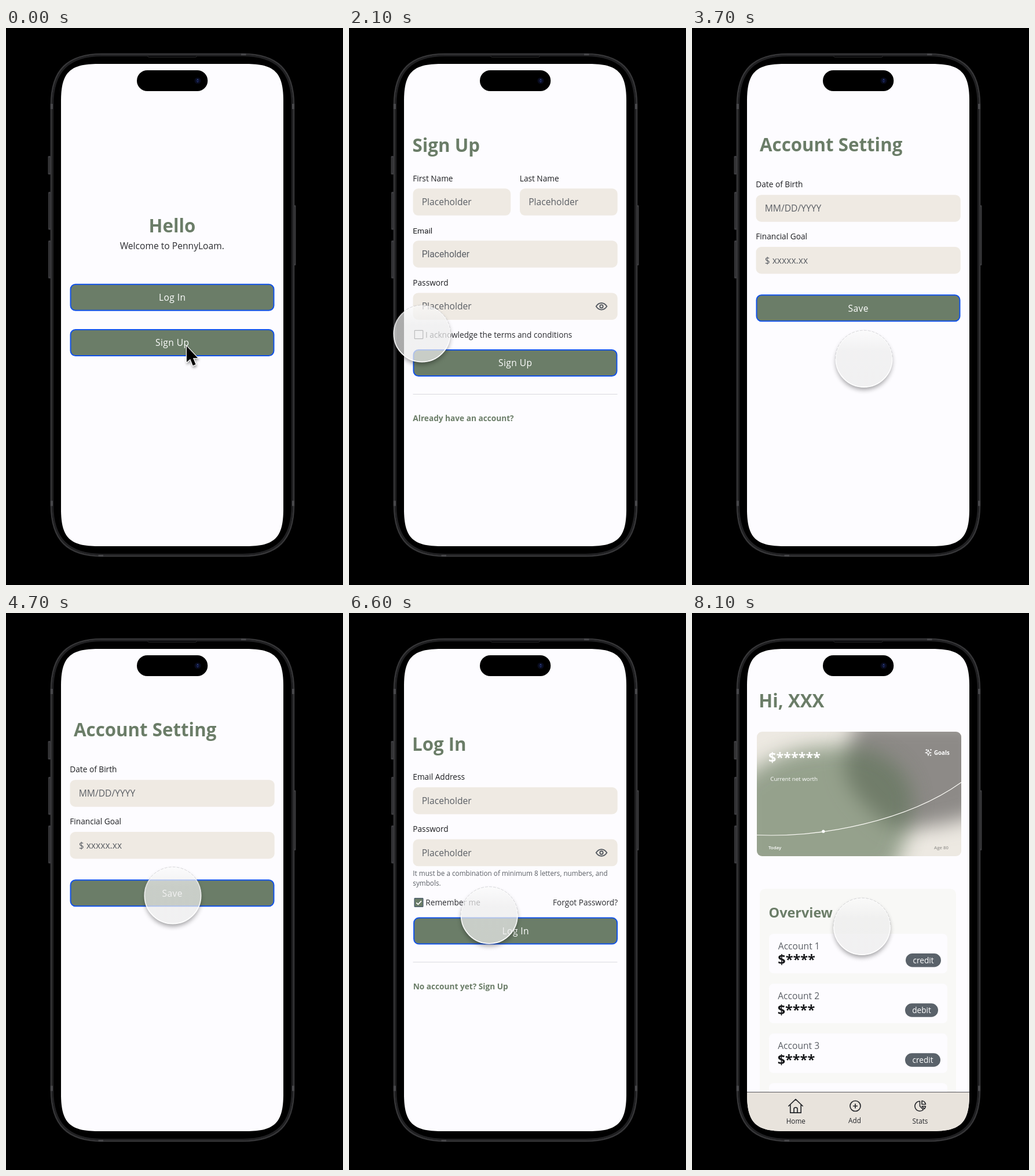
Recreate the animation shown at these times as an HTML page. Size 582 by 962 pixels, loop 8.2 s.

```html
<!DOCTYPE html>
<html lang="en">
<head>
<meta charset="utf-8">
<title>Budget app prototype</title>
<style>
  html, body { margin: 0; width: 100%; height: 100%; overflow: hidden; background: #000; }
  svg { display: block; width: 100vw; height: 100vh; }
  text { font-family: "Open Sans", "Noto Sans", sans-serif; fill: #1c1d20; white-space: pre; }
</style>
</head>
<body>
<svg id="stage" viewBox="0 0 582 962"></svg>
<script>
const GREEN = '#6b7d68', BLUE = '#1152ea', FIELD = '#efeae3', PAPER = '#fdfcff',
      GREY = '#5b5f65', INK = '#2b2c30';
const LOOP = 8200, STEP = 100;
const PT = 384 / 393; // stage pixels per design point

const el = (tag, attrs = {}, body = '') =>
  `<${tag} ${Object.entries(attrs).map(([k, v]) => `${k}="${v}"`).join(' ')}>${body}</${tag}>`;
const rect = (x, y, width, height, rx, fill, more = {}) => el('rect', { x, y, width, height, rx, fill, ...more });
const circle = (cx, cy, r, fill, more = {}) => el('circle', { cx, cy, r, fill, ...more });
const path = (d, fill = 'none', stroke = 'none', width = 1, more = {}) =>
  el('path', { d, fill, stroke, 'stroke-width': width, ...more });
const text = (x, y, size, str, more = {}) => el('text', { x, y, 'font-size': size * PT, ...more }, str);

// Rectangle with smoothed corners
function squircle(x, y, w, h, s, c) {
  const r = x + w, b = y + h;
  return `M${x + s} ${y}H${r - s}C${r - c} ${y} ${r} ${y + c} ${r} ${y + s}V${b - s}` +
    `C${r} ${b - c} ${r - c} ${b} ${r - s} ${b}H${x + s}C${x + c} ${b} ${x} ${b - c} ${x} ${b - s}` +
    `V${y + s}C${x} ${y + c} ${x + c} ${y} ${x + s} ${y}Z`;
}
const screenPath = squircle(95, 62, 384, 833, 64, 15);

// Interface parts
const title = (x, y, str) => text(x, y, 32, str, { 'font-weight': 700, style: `fill:${GREEN}` });
const label = (x, y, str, more) => text(x, y, 14, str, more);
const link = (x, y, str) => label(x, y, str, { 'font-weight': 700, style: `fill:${GREEN}` });
const rule = y => path(`M110.5 ${y}H463.5`, 'none', '#d9d9de', 1);
const field = (x, y, w, hint, font = '') =>
  rect(x, y, w, 46.5, 9, FIELD) + text(x + 15.2, y + 29, 16, hint, { style: `fill:${GREY};${font}` });
const button = (y, str, x = 111.5) =>
  rect(x, y, 351, 45, 8.5, GREEN, { stroke: BLUE, 'stroke-width': 2 }) +
  text(x + 175.7, y + 28.3, 16, str, { 'text-anchor': 'middle', 'letter-spacing': 0.4, style: 'fill:#fff' });
const eye = y =>
  path(`M426.8 ${y}Q430.5 ${y - 5.8} 436 ${y - 5.8}T445.3 ${y}Q441.5 ${y + 5.8} 436 ${y + 5.8}T426.8 ${y}Z`,
    'none', '#565b62', 1.9) + circle(436, y, 2.7, 'none', { stroke: '#565b62', 'stroke-width': 1.9 });
const checkbox = (y, id) =>
  rect(113.3, y, 14.4, 14.4, 0.5, 'none', { stroke: '#3b3c42', 'stroke-width': 1.2 }) +
  el('g', { id }, rect(113.3, y, 14.4, 14.4, 0.5, GREEN, { stroke: '#4d6170', 'stroke-width': 1.2 }) +
    path(`M116.3 ${y + 7.5}l3 3 5.6-6`, 'none', '#fff', 1.8));

const welcome =
  text(287, 353, 32, 'Hello', { 'font-weight': 700, 'text-anchor': 'middle', style: `fill:${GREEN}` }) +
  text(286.8, 382, 16, 'Welcome to PennyLoam.', { 'text-anchor': 'middle', style: `fill:${INK}` }) +
  button(442.8, 'Log In') + button(521, 'Sign Up');

const roboto = 'font-family:Roboto,sans-serif';
const signup =
  title(109.6, 214, 'Sign Up') +
  label(110.3, 264.5, 'First Name') + field(110.5, 277.3, 168.7, 'Placeholder') +
  label(294.8, 264.5, 'Last Name') + field(295, 277.3, 168.7, 'Placeholder') +
  label(110.3, 354.5, 'Email', { style: roboto }) + field(110.5, 367.2, 353.2, 'Placeholder', roboto) +
  label(110.3, 444.5, 'Password') + field(110.5, 457.4, 353.2, 'Placeholder') + eye(480.8) +
  checkbox(522.3, 'agreeTick') +
  label(132, 534.5, 'I acknowledge the terms and conditions', { style: `fill:${INK}` }) +
  button(556, 'Sign Up') + rule(632.5) + link(110.3, 679, 'Already have an account?');

const account =
  title(117, 213, 'Account Setting') +
  label(110.3, 275.3, 'Date of Birth') + field(110.5, 288.2, 353.2, 'MM/DD/YYYY') +
  label(110.3, 365.2, 'Financial Goal') + field(110.5, 378, 353.2, '$ xxxxx.xx') +
  button(461.2, 'Save');

const small = { style: `fill:${GREY}` };
const login =
  title(109, 237.5, 'Log In') +
  label(110.3, 288, 'Email Address') + field(110.5, 301, 353.2, 'Placeholder') +
  label(110.3, 378, 'Password') + field(110.5, 390.8, 353.2, 'Placeholder') + eye(414) +
  text(110.3, 454.3, 12, 'It must be a combination of minimum 8 letters, numbers, and', small) +
  text(110.3, 471, 12, 'symbols.', small) +
  checkbox(492.8, 'rememberTick') + label(132.3, 505, 'Remember me', { style: `fill:${INK}` }) +
  label(464, 505, 'Forgot Password?', { 'text-anchor': 'end', style: `fill:${INK}` }) +
  button(526.6, 'Log In', 112.1) + rule(603) + link(110.7, 650, 'No account yet? Sign Up');

const bold = (x, y, size, str, fill) => text(x, y, size, str, { 'font-weight': 700, style: `fill:${fill}` });
const worthCard =
  el('g', { 'clip-path': 'url(#cardClip)' },
    rect(112, 205, 353, 215, 0, '#ede9e2') +
    path('M285 185H500V345Q430 372 350 372Q268 320 262 262Z', '#8d8a87', 'none', 1, { filter: 'url(#haze)' }) +
    path('M80 292Q150 232 235 231C320 222 385 265 382 335Q378 375 346 450H80Z', '#5f7459', 'none', 1,
      { filter: 'url(#haze)', opacity: 0.62 }) +
    path('M112 383.5C225 388 372 359 465 292.5', 'none', '#fbfaf5', 1.2) + circle(226.8, 377.2, 2.6, '#fff')) +
  bold(132, 257.5, 24, '$******', '#fff') +
  text(135.3, 290, 10, 'Current net worth', { style: 'fill:#fff' }) +
  path('M408 236.5l1.3 3.4 3.4 1.3-3.4 1.3-1.3 3.4-1.3-3.4-3.4-1.3 3.4-1.3ZM405 235v3M403.5 236.5h3' +
    'M412.5 235v2.6M411.2 236.3h2.6M412 244.5v2.6M410.7 245.8h2.6', 'none', '#fff', 1.1) +
  bold(418, 244.7, 10, 'Goals', '#fff') +
  text(132, 408.3, 8, 'Today', { 'font-weight': 600, style: 'fill:#fff' }) +
  text(418, 408.3, 8, 'Age 80', { 'font-weight': 600, style: 'fill:#9a9894' });

const accountRow = (n, y, x, kind, pillX, pillW) =>
  rect(133, y, 308, 68.3, 8, PAPER) +
  text(x, y + 27, 16, 'Account ' + n, small) + bold(x - 0.5, y + 53.3, 24, '$****', '#17181b') +
  rect(pillX, y + 34, pillW, 23.5, 11.75, '#5a626a') +
  text(pillX + pillW / 2, y + 50.8, 14, kind, { 'text-anchor': 'middle', style: 'fill:#fff' });

const navText = (x, y, str) => text(x, y, 12, str, { 'text-anchor': 'middle', style: 'fill:#222428' });
const navBar =
  rect(95, 827, 384, 70, 0, '#e8e3dc') + path('M95 827.5H479', 'none', '#55555a', 1.2) +
  path('M166.8 851.5L179 839.8 191.2 851.5M169.8 849V863.2H188.2V849M176 863V856.5Q176 854.2 179 854.2T182 856.5V863',
    'none', '#25272b', 1.7, { 'stroke-linejoin': 'round', 'stroke-linecap': 'round' }) +
  circle(282, 851.5, 9, 'none', { stroke: '#25272b', 'stroke-width': 1.7 }) +
  path('M278 851.5h8M282 847.5v8', 'none', '#25272b', 1.7) +
  path('M393.5 843.2A8.5 8.5 0 1 0 399.5 857.7L393.5 851.7ZM397 842.5V848.5H403.5A7.5 7.5 0 0 0 397 842.5Z' +
    'M397 852H403.4A9 9 0 0 1 401.2 856.4Z', 'none', '#25272b', 1.6, { 'stroke-linejoin': 'round' }) +
  navText(179.3, 881.8, 'Home') + navText(281, 881, 'Add') + navText(394, 881.8, 'Stats');

const dashboard =
  title(115.3, 162.5, 'Hi, XXX') + worthCard +
  rect(117, 476.5, 339, 380, 9, '#f8f8f6') + bold(132.5, 526.3, 24, 'Overview', GREEN) +
  accountRow(1, 554, 148.8, 'credit', 369, 61) +
  accountRow(2, 640.2, 148.2, 'debit', 368, 57) +
  accountRow(3, 726.3, 148.2, 'credit', 368, 61) +
  rect(133, 812, 308, 68, 8, PAPER) + navBar;

// Device
const sideKey = (x, y, w, h) => rect(x, y, w, h, 1.5, '#3c3c3f') + rect(x + w / 3, y + 3, 1, h - 6, 0.5, '#242426');
const band = (x, y, w, h) => rect(x, y, w, h, 0, '#48484b');
const device =
  sideKey(72.5, 221, 5, 32) + sideKey(73, 283, 5, 65.5) + sideKey(73, 367, 5, 65.5) + sideKey(496.5, 306, 4, 104) +
  path(squircle(78, 45, 419, 867, 88, 28), '#000', '#363638', 2.6) +
  path(squircle(80.6, 47.6, 413.8, 861.8, 86, 27), '#000', '#202022', 3) +
  band(76.8, 131, 4, 9) + band(494, 131, 4, 9) + band(76.8, 816.5, 4, 9) + band(494, 816.5, 4, 9) +
  band(406, 44, 8.5, 3) + band(159.5, 910, 8.5, 3) +
  rect(245, 47.5, 84, 3, 1.5, '#08080a', { stroke: '#2c2c2e', 'stroke-width': 0.8 }) +
  path(screenPath, PAPER);
const island =
  rect(226, 73, 122.3, 36, 18, '#000') + circle(331, 91, 5.6, '#080b1c') +
  circle(331, 91, 2.8, '#10183c') + circle(331, 89, 1.2, '#2a3a75') + circle(331, 93, 1, '#26306a');

// Pointers, each with its origin at the hot spot
const arrow = path('M0 0V27.6L6.2 22.2 10.8 33.6 15.6 31.6 11 20.4H19.2Z', '#000', '#fff', 2.2,
  { 'stroke-linejoin': 'round', 'paint-order': 'stroke', filter: 'url(#lift)' });
const touch =
  el('g', { mask: 'url(#outside)' }, circle(0, 5, 48, '#000', { opacity: 0.38, filter: 'url(#soft)' })) +
  circle(0, 0, 49, 'url(#glass)') +
  circle(0, 0, 48.7, 'none', { stroke: 'url(#rim)', 'stroke-width': 1.8 }) +
  path('M-49.3 0A49.3 49.3 0 0 1 49.3 0', 'none', '#a5a5a8', 0.6, { 'stroke-dasharray': '5 2', opacity: 0.7 });

const stop = (offset, color, alpha) => el('stop', { offset, 'stop-color': color, 'stop-opacity': alpha });
const gradient = (id, ...stops) => el('linearGradient', { id, x1: 0, y1: 0, x2: 0, y2: 1 }, stops.join(''));
const blur = (id, stdDeviation) =>
  el('filter', { id, x: '-40%', y: '-40%', width: '180%', height: '180%' }, el('feGaussianBlur', { stdDeviation }));
const defs = el('defs', {},
  el('clipPath', { id: 'screenClip' }, path(screenPath)) +
  el('clipPath', { id: 'cardClip' }, rect(112, 205, 353, 215, 9, '#000')) +
  blur('haze', 17) + blur('soft', 4) +
  el('filter', { id: 'lift', x: '-40%', y: '-40%', width: '200%', height: '200%' },
    el('feDropShadow', { dx: 1, dy: 3, stdDeviation: 2.2, 'flood-opacity': 0.4 })) +
  el('mask', { id: 'outside', maskUnits: 'userSpaceOnUse', x: -80, y: -80, width: 160, height: 160 },
    rect(-80, -80, 160, 160, 0, '#fff') + circle(0, 0, 49, '#000')) +
  gradient('glass', stop(0, '#fafafa', 0.7), stop(0.35, '#ededed', 0.72), stop(1, '#ececec', 0.72)) +
  gradient('rim', stop(0, '#fff', 0.5), stop(0.5, '#fff', 0.8), stop(1, '#fff', 1)));

const screens = { welcome, signup, account, login, dashboard };
document.getElementById('stage').innerHTML = defs + rect(0, 0, 582, 962, 0, '#000') + device +
  el('g', { 'clip-path': 'url(#screenClip)' },
    Object.entries(screens).map(([id, body]) => el('g', { id }, body)).join('')) +
  island + el('g', { id: 'arrow', transform: 'translate(312 549.5)' }, arrow) + el('g', { id: 'touch' }, touch);

// Timeline: [start ms, screen]
const cuts = [[0, 'welcome'], [700, 'signup'], [3500, 'account'], [4800, 'login'], [7100, 'dashboard']];
// Touch path: [ms, x, y]
const moves = [
  [200, 300, 548], [500, 294, 546.5], [1400, 294, 546.5], [2000, 126, 528], [2900, 125, 528],
  [3400, 297, 571.5], [3800, 297, 571.5], [4300, 288, 488], [5200, 288, 488], [5500, 256, 493],
  [6000, 126, 501], [6400, 126, 501], [6700, 283, 529.5], [7000, 293.5, 541.5], [8200, 293.5, 541.5]
];
const ease = u => u * u * (3 - 2 * u);

function touchAt(t) {
  const i = Math.max(1, moves.findIndex(m => m[0] >= t));
  const [t0, x0, y0] = moves[i - 1], [t1, x1, y1] = moves[i];
  const u = ease(Math.min(1, Math.max(0, (t - t0) / (t1 - t0))));
  return [x0 + (x1 - x0) * u, y0 + (y1 - y0) * u];
}

const show = (id, on) => document.getElementById(id).setAttribute('display', on ? 'inline' : 'none');

function draw(t) {
  const current = cuts.filter(c => c[0] <= t).pop()[1];
  for (const id in screens) show(id, id === current);
  show('agreeTick', t >= 2400);
  show('rememberTick', t >= 6200);
  show('arrow', t < 200);
  show('touch', t >= 200);
  document.getElementById('touch').setAttribute('transform', `translate(${touchAt(t).join(' ')})`);
}

const start = performance.now();
let last = -1;
function tick() {
  const t = Math.floor(((performance.now() - start) % LOOP) / STEP) * STEP;
  if (t !== last) draw(last = t);
  requestAnimationFrame(tick);
}
tick();
</script>
</body>
</html>
```
